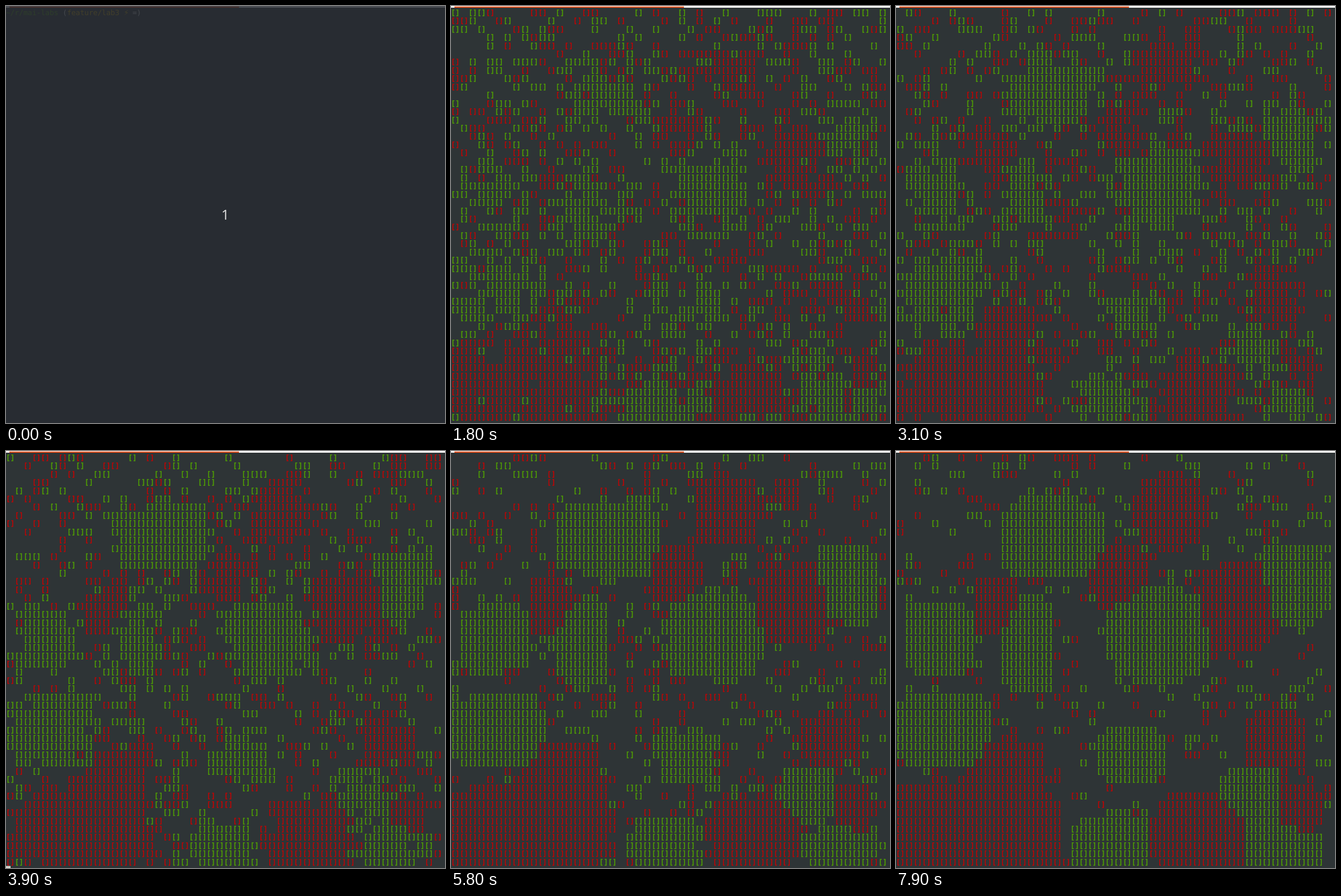
Write an HTML page that moves like this. It is 767 px wide and 730 px high and loops after 8 s.

```html
<!DOCTYPE html>
<html lang="en">
<head>
<meta charset="utf-8">
<title>Segregation model in a terminal</title>
<style>
html, body { margin: 0; width: 100%; height: 100%; overflow: hidden; background: #2e3436; }
svg { display: block; }
text { font: 12.66px "DejaVu Sans Mono", monospace; white-space: pre; text-rendering: geometricPrecision; }
.green { fill: #4e9a06; }
.red { fill: #cc0000; }
.yellow { fill: #c4a000; }
.light { fill: #d3d7cf; }
.bolt { font-family: "DejaVu Sans", sans-serif; }
#grid .green { stroke: #4e9a06; stroke-width: 0.6px; }
#grid .red { stroke: #cc0000; stroke-width: 0.35px; }
.count { font: 24px "Open Sans", sans-serif; fill: #e6e6e6; text-anchor: middle; }
</style>
</head>
<body>
<svg width="767" height="730" viewBox="0 0 767 730">
  <rect width="767" height="730" fill="#2e3436"/>
  <rect width="767" height="3" fill="#f6f5f4"/>
  <rect x="6" y="1" width="401" height="2" fill="#e95420"/>
  <g id="shell"></g>
  <g id="grid"></g>
  <rect id="cursor" class="light" width="8" height="14.4"/>
  <g id="veil">
    <rect width="767" height="730" fill="#272b32"/>
    <text id="count" class="count" x="383" y="374">1</text>
  </g>
</svg>
<script>
const LOOP = 8000, START = 1500, SIZE = 50;
const CHAR = 7.617, LINE = 14.45, BASE = 15.7;

// Generations come in bursts with a pause after each one.
const BURSTS = [3, 2, 4, 2, 2, 2, 7, 4, 4, 1], BEAT = 167, PAUSE = 300;
const steps = [];
for (const count of BURSTS) {
  const from = steps.length ? steps[steps.length - 1] + PAUSE : START;
  for (let i = 0; i < count; i++) steps.push(from + Math.round(i * BEAT / 100) * 100);
}

// Final clusters as rounded blobs: column, row, half width, half height.
const CLUSTERS = {
  green: [
    [17.5, 9.8, 6.5, 5], [4.3, 22, 4.2, 4.8], [4.8, 33, 6, 5], [14.5, 22.8, 3.5, 6], [29.8, 21.5, 6, 5.8],
    [45, 15.3, 4.2, 5.3], [26.5, 36.2, 4, 3.6], [40.2, 41, 3.8, 3.7], [24, 46.8, 4.6, 3.8], [43.8, 47.3, 4.8, 3]
  ],
  red: [
    [31, 6.5, 4.2, 4.6], [25, 14, 3.2, 4], [38.8, 18, 4.8, 5.3], [11.2, 18, 2.8, 4], [43, 34.3, 4, 3.5],
    [12.5, 39, 4.5, 5], [8.5, 45, 10, 6], [34.3, 46, 5.6, 5.5], [45.8, 42.5, 2.6, 3.4]
  ]
};

const $ = id => document.getElementById(id);
const show = (el, on) => { el.style.display = on ? "" : "none"; };

function addText(parent, cls, x, y, str = "") {
  const el = document.createElementNS("http://www.w3.org/2000/svg", "text");
  el.setAttribute("class", cls);
  el.setAttribute("x", x);
  el.setAttribute("y", y);
  el.textContent = str;
  parent.appendChild(el);
  return el;
}

function rand(a, b, c) {
  let h = Math.imul(a + 11, 374761393) ^ Math.imul(b + 7, 668265263) ^ Math.imul(c + 3, 1274126177);
  h = Math.imul(h ^ (h >>> 15), 2246822519);
  h = Math.imul(h ^ (h >>> 13), 3266489917);
  return ((h ^ (h >>> 16)) >>> 0) / 4294967296;
}

// How far a cell lies inside the nearest cluster of a colour; negative outside.
function depth(list, row, col) {
  return Math.max(...list.map(([x, y, w, h]) => {
    const reach = Math.cbrt(Math.abs((col - x) / w) ** 3 + Math.abs((row - y) / h) ** 3);
    return (1 - reach) * Math.min(w, h);
  }));
}

const cells = [];
for (let row = 0; row < SIZE; row++) {
  for (let col = 0; col < SIZE; col++) {
    const g = depth(CLUSTERS.green, row, col), r = depth(CLUSTERS.red, row, col);
    cells.push({ row, col, kind: g >= r ? "green" : "red", deep: Math.max(g, r) });
  }
}

// Clusters settle from the core outward; other cells keep being redealt.
function cellKind({ row, col, kind, deep }, step, p) {
  const home = deep >= 0;
  const limit = 2.8 * (1 - p) ** 1.7;
  const jitter = (rand(row, col, 1) - 0.5) * Math.min(1.2, limit);
  if (home && Math.min(deep, 3) + jitter >= limit) return kind;
  const age = Math.floor(step / 2 + rand(row, col, 2));
  const early = Math.max(0, 1 - p * 8) * (row / SIZE) ** 8;
  const fill = (home ? 0.64 : 0.42 - 0.18 * p) + early;
  if (rand(row, col, 10 + age) > fill) return "";
  const mix = rand(row, col, 100 + age);
  if (home) return mix < 0.82 ? kind : kind === "green" ? "red" : "green";
  return mix < 0.48 ? "green" : "red";
}

const lines = [];
for (let row = 0; row < SIZE; row++) {
  const y = BASE + row * LINE;
  lines.push({ green: addText($("grid"), "green", 0, y), red: addText($("grid"), "red", 0, y) });
}

let shown = -1;
function drawGrid(step) {
  if (step === shown) return;
  shown = step;
  const p = (steps[step] - START) / (steps[steps.length - 1] - START);
  const kinds = cells.map(c => cellKind(c, step, p));
  lines.forEach((line, row) => {
    const part = kinds.slice(row * SIZE, row * SIZE + SIZE);
    for (const kind of ["green", "red"])
      line[kind].textContent = part.map(k => k === kind ? "[]" : "  ").join("");
  });
}

const say = (cls, col, str) => addText($("shell"), cls, col * CHAR, BASE, str);
say("green", 0, "~/r/mai-labs");
say("light", 13, "(");
say("yellow", 14, "feature/lab3");
say("yellow bolt", 27, "\u26a1\ufe0e");
say("light", 29, "=)");
const command = say("light", 32, "python3 lab3/main.py --size 50 --run");

function placeCursor(col, row, on) {
  $("cursor").setAttribute("x", col * CHAR);
  $("cursor").setAttribute("y", 4 + row * LINE);
  show($("cursor"), on);
}

function draw(t) {
  const running = t >= START;
  show($("shell"), !running);
  show($("grid"), running);
  show(command, t >= 500);
  show($("veil"), t < 300);
  $("veil").firstElementChild.setAttribute("opacity", t < 200 ? 0.83 : 0.4);
  $("count").setAttribute("opacity", t < 200 ? 1 : 0.5);

  if (running) {
    drawGrid(steps.filter(s => s <= t).length - 1);
    placeCursor(0, SIZE, t >= 2300 && (t - 2300) % 1200 < 600);
  } else if (t < 1200) {
    placeCursor(t < 500 ? 32 : 68, 0, t >= 300 && t < 900);
  } else {
    placeCursor(0, 1, true);
  }
}

function tick(now) {
  draw(now % LOOP);
  requestAnimationFrame(tick);
}
draw(0);
requestAnimationFrame(tick);
</script>
</body>
</html>
```
